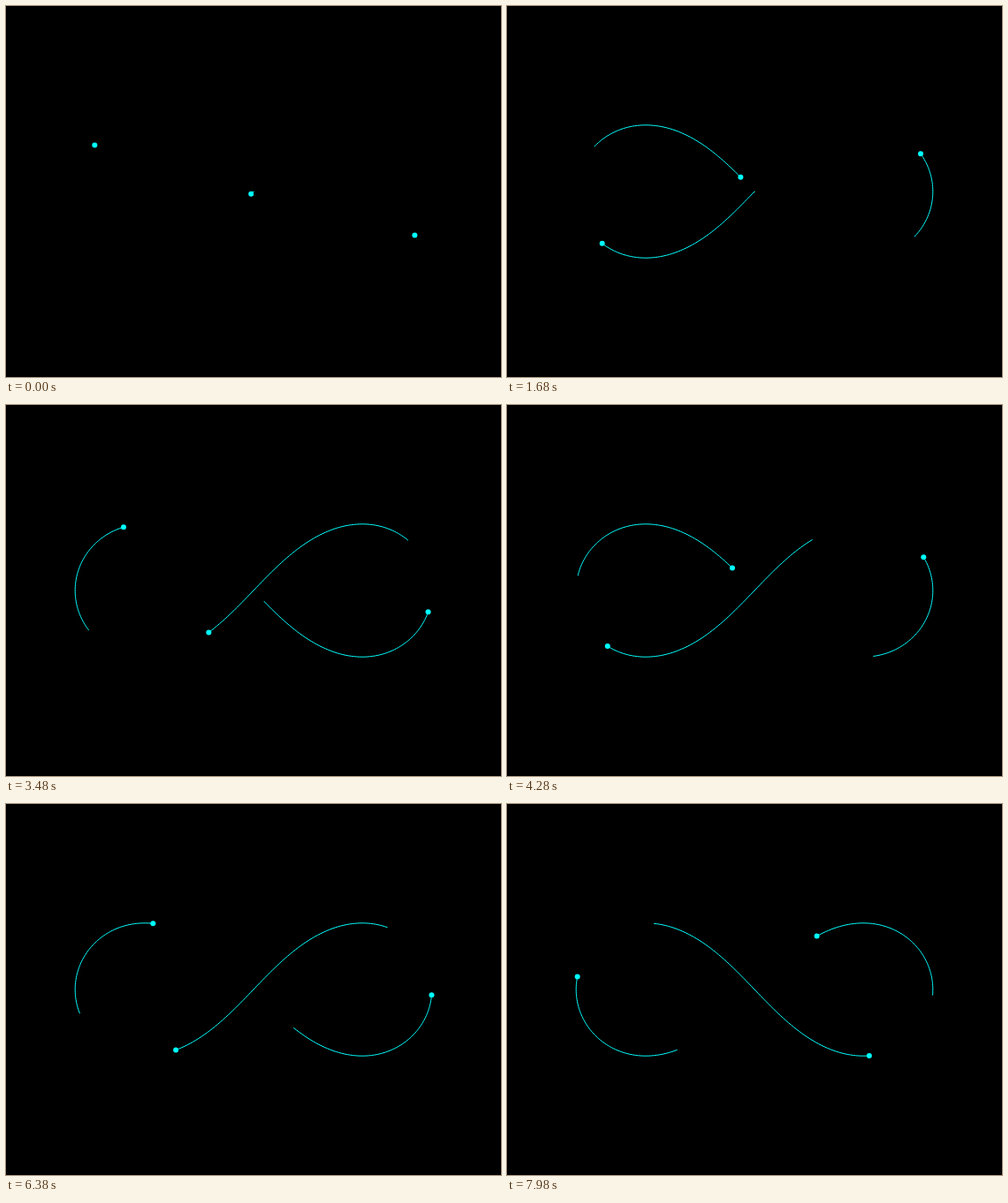
Animation of 560 by 420 pixels, one loop 8000 ms. Source, as an HTML page with a canvas:

```html
<!DOCTYPE html>
<html lang="en">
<head>
<meta charset="utf-8">
<title>Figure-eight orbit</title>
<style>
html, body { margin: 0; width: 100%; height: 100%; overflow: hidden; background: #000; }
canvas { display: block; }
</style>
</head>
<body>
<canvas id="stage" width="560" height="420"></canvas>
<script>
const ctx = document.getElementById('stage').getContext('2d');

const LOOP = 8000, HOLD = 500, TICK = 20;
const STEPS = 376, TRAIL = 80, SUB = 8;
const DT = 6.32591398 / 400;

// State: x, y of three equal masses, then their velocities.
const X = 0.97000436, Y = 0.24308753, VX = 0.93240737, VY = 0.86473146;
let state = [
  X, -Y, -X, Y, 0, 0,
  VX / 2, VY / 2, VX / 2, VY / 2, -VX, -VY
];

function derive(s) {
  const d = s.slice(6).concat([0, 0, 0, 0, 0, 0]);
  for (let i = 0; i < 3; i++) {
    for (let j = 0; j < 3; j++) {
      if (i === j) continue;
      const dx = s[2 * j] - s[2 * i];
      const dy = s[2 * j + 1] - s[2 * i + 1];
      const r3 = Math.hypot(dx, dy) ** 3;
      d[6 + 2 * i] += dx / r3;
      d[7 + 2 * i] += dy / r3;
    }
  }
  return d;
}

const add = (s, d, h) => s.map((v, i) => v + d[i] * h);

function rk4(s, h) {
  const a = derive(s);
  const b = derive(add(s, a, h / 2));
  const c = derive(add(s, b, h / 2));
  const d = derive(add(s, c, h));
  return s.map((v, i) => v + h / 6 * (a[i] + 2 * b[i] + 2 * c[i] + d[i]));
}

const path = [state];
for (let k = 1; k <= STEPS; k++) {
  for (let i = 0; i < SUB; i++) state = rk4(state, DT / SUB);
  path.push(state);
}

// View spans x -1.5..1.5 and y -1..1.
const px = (k, body) => 280 + path[k][2 * body] * 560 / 3;
const py = (k, body) => 210 - path[k][2 * body + 1] * 210;

function draw(t) {
  const tick = t < HOLD ? 0 : 1 + Math.floor((t - HOLD) / TICK + 1e-6);
  const now = Math.min(tick + 1, STEPS);
  const tail = Math.max(0, now - TRAIL);

  ctx.fillStyle = '#000';
  ctx.fillRect(0, 0, 560, 420);
  ctx.strokeStyle = ctx.fillStyle = '#0ff';
  ctx.lineWidth = 1;
  ctx.lineJoin = 'round';
  ctx.lineCap = 'square';

  for (let body = 0; body < 3; body++) {
    ctx.beginPath();
    for (let k = tail; k <= now; k++) ctx.lineTo(px(k, body), py(k, body));
    ctx.stroke();
    ctx.beginPath();
    ctx.arc(px(now, body), py(now, body), 3, 0, 2 * Math.PI);
    ctx.fill();
  }
}

let start = null;
function loop(time) {
  if (start === null) start = time;
  draw((time - start) % LOOP);
  requestAnimationFrame(loop);
}
draw(0);
requestAnimationFrame(loop);
</script>
</body>
</html>
```
